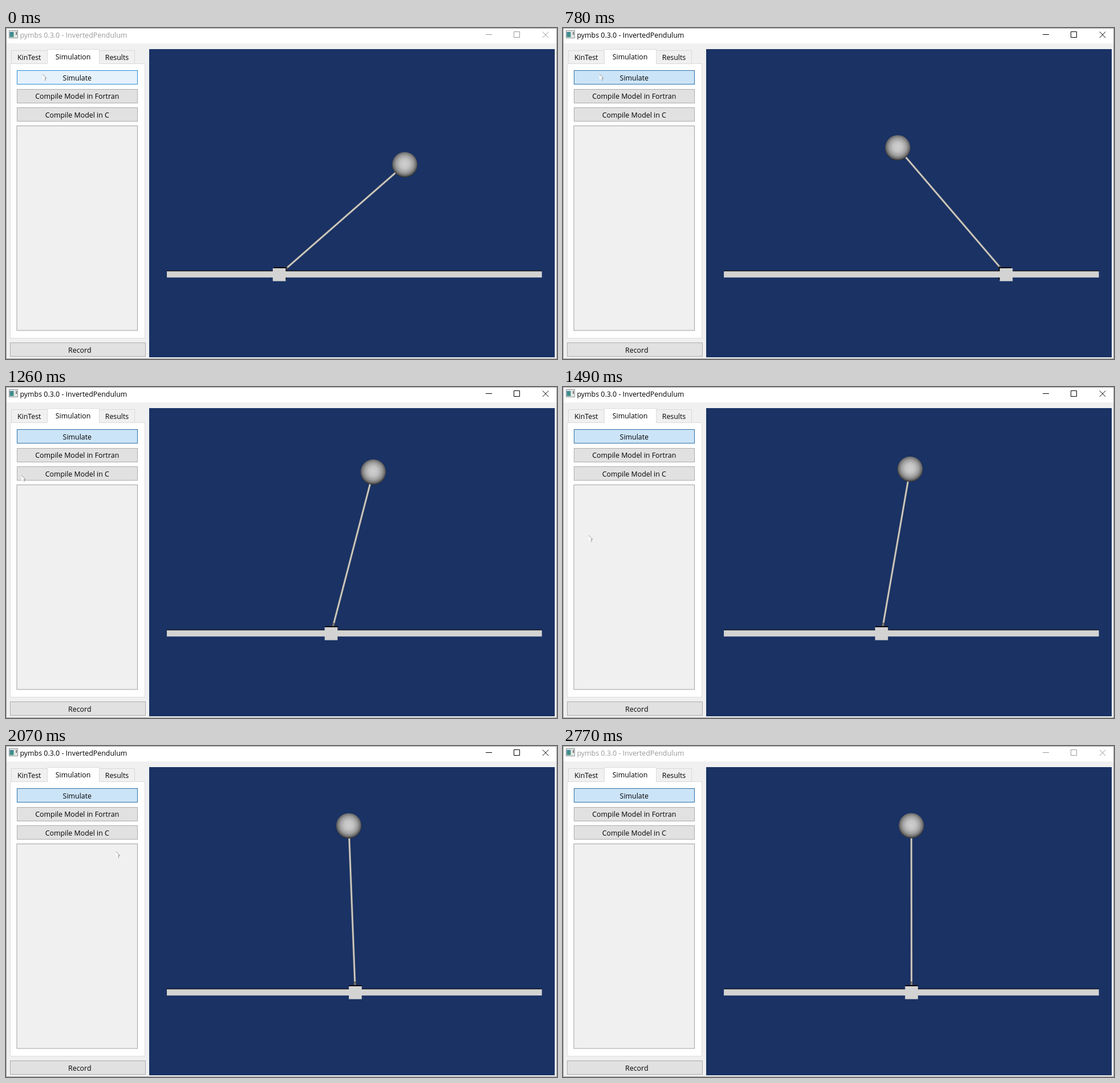
These frames come from a looping animation (966 px wide and 580 px high, 2790 ms). An HTML page:

```html
<!DOCTYPE html>
<html lang="en">
<head>
<meta charset="utf-8">
<title>Inverted pendulum</title>
<style>
  html, body { margin: 0; width: 100%; height: 100%; overflow: hidden; background: #f0f0f0; }
  svg { display: block; width: 966px; height: 580px; }
  text { font: 12.4px "Open Sans", "Noto Sans", sans-serif; fill: #000; }
  .mid { text-anchor: middle; }
  .btn { fill: #e1e1e1; stroke: #adadad; }
  .tab { fill: #f0f0f0; stroke: #d9d9d9; }
  .page { fill: #fff; stroke: #dcdcdc; }
  #run { fill: #e5f1fb; stroke: #2a8dd8; }
  .pressed #run { fill: #cce4f7; stroke: #2d70a8; }
  #caption text { fill: #999; }
  #caption path { fill: none; stroke: #999; }
  .active #caption text { fill: #000; }
  .active #caption path { stroke: #000; }
</style>
</head>
<body>
<svg id="stage" viewBox="0 0 966 580">
  <defs>
    <radialGradient id="ball" cx=".5" cy=".47" r=".53">
      <stop offset="0" stop-color="#d0d0d0"/>
      <stop offset=".35" stop-color="#c3c3c3"/>
      <stop offset=".65" stop-color="#9e9e9e"/>
      <stop offset=".86" stop-color="#6c6c6c"/>
      <stop offset="1" stop-color="#2b2b2b"/>
    </radialGradient>
    <linearGradient id="screen" x2="1" y2="1">
      <stop offset="0" stop-color="#3f7fa0"/>
      <stop offset="1" stop-color="#3f9a78"/>
    </linearGradient>
  </defs>

  <rect width="966" height="580" fill="#f0f0f0"/>
  <rect width="966" height="27" fill="#fff"/>

  <g id="caption">
    <rect x="5.5" y="4.5" width="15" height="13" fill="#e4e6e6" stroke="#8f9696"/>
    <rect x="6.5" y="7" width="7" height="9" fill="url(#screen)"/>
    <rect x="17.5" y="7" width="1.5" height="5" fill="#555"/>
    <text x="24.5" y="17">pymbs 0.3.0 - InvertedPendulum</text>
    <path d="M841 11.5h11M890.5 6.5h10v10h-10zM940.7 6.5l10.5 10.5M951.2 6.5l-10.5 10.5"/>
  </g>

  <rect class="page" x="7.5" y="62.5" width="236" height="481"/>
  <rect class="tab" x="9.5" y="39.5" width="63" height="23"/>
  <rect class="tab" x="163.5" y="39.5" width="62" height="23"/>
  <path class="page" d="M72.5 63V37.5h91V63"/>
  <rect x="73" y="61" width="90" height="3" fill="#fff"/>
  <text class="mid" x="40.7" y="56">KinTest</text>
  <text class="mid" x="117.6" y="55">Simulation</text>
  <text class="mid" x="194.5" y="56">Results</text>

  <rect id="run" x="19.5" y="74.5" width="211" height="24"/>
  <rect class="btn" x="19.5" y="107.5" width="211" height="24"/>
  <rect class="btn" x="19.5" y="139.5" width="211" height="24"/>
  <rect class="btn" x="7.5" y="551.5" width="237" height="24"/>
  <text class="mid" x="124.8" y="92">Simulate</text>
  <text class="mid" x="124.8" y="124.3">Compile Model in Fortran</text>
  <text class="mid" x="124.8" y="157">Compile Model in C</text>
  <text class="mid" x="129.3" y="569.3">Record</text>
  <rect x="19" y="171.5" width="211.5" height="358.5" fill="#f0f0f0" stroke="#a0a0a0"/>

  <rect x="251" y="37" width="711" height="540" fill="#1a3264"/>
  <g id="arm" stroke-linecap="butt">
    <path d="M0 0V-275" stroke="#85837f" stroke-width="3.6"/>
    <path d="M0 0V-275" stroke="#d6d2ca" stroke-width="2"/>
    <path d="M0 0V-19" stroke="#45474b" stroke-width="5"/>
    <path d="M0 0V-18" stroke="#85878a" stroke-width="2"/>
  </g>
  <circle id="bob" r="22.2" fill="url(#ball)"/>
  <rect id="back" x="-11" y="419" width="22" height="22" fill="#05070c"/>
  <rect x="282" y="425" width="657.5" height="2" fill="#0a0d14"/>
  <rect x="282" y="426.3" width="657.5" height="10.9" fill="#d3d3d3"/>
  <rect id="cart" x="-11.3" y="421" width="22.6" height="22.6" fill="#d3d3d3"/>

  <g id="cursor">
    <path d="M0 0V9.5L2.3 7.6 3.8 11 5.4 10.2 4 7.2 7 7Z" fill="#fff"/>
    <path d="M0 0L7 7H4L5.4 10.2 3.8 11" fill="none" stroke="#777" stroke-width=".8"/>
  </g>
  <path d="M.5 .5H965.5V579.5H.5Z" fill="none" stroke="#9b9b9b"/>
</svg>

<script>
const LOOP = 2790, PRESS = 430, BLUR = 2720, LEAVE = 2600;
const HOME = 611, AXIS = 432, LENGTH = 292.4;

// Screen updates come every 60 ms, apart from a few uneven ones.
const UNEVEN = { 5: 50, 11: 50, 12: 70, 15: 50, 23: 50, 27: 50, 35: 50, 40: 50 };
const ticks = [0, PRESS];
for (let i = 1; i <= 40; i++) ticks.push(ticks[i] + (UNEVEN[i] || 60));

// time, cart x, pendulum angle
const swing = [
  [490, 479, .852], [550, 500, .72], [610, 560, .3], [670, 645, -.25],
  [720, 715, -.56], [780, 777, -.708], [840, 796, -.66], [900, 797, -.5],
  [960, 768, -.3], [1070, 653.5, .024], [1140, 606, .14], [1260, 570, .255],
  [1370, 559, .275], [1430, 557.5, .25], [1490, 558.5, .172], [1610, 568, .045],
  [1730, 587, -.03], [1840, 603, -.053], [2010, 612.5, -.045],
  [2310, 611.3, -.0154], [2770, 611, -.001]
];

// time, pointer x, pointer y
const pointer = [
  [900, 64, 81], [1070, 31, 76], [1490, 45, 260],
  [1840, 192, 187], [2010, 192, 187], [2310, 198, 166]
];

function slope(keys, i, c) {
  const a = keys[i - 1], b = keys[i], d = keys[i + 1];
  if (!a || !d || (b[c] - a[c]) * (d[c] - b[c]) <= 0) return 0;
  return (d[c] - a[c]) / (d[0] - a[0]);
}

// Cubic Hermite curve through column c, level at turning points.
function curve(keys, t, c) {
  const last = keys.length - 1;
  if (t <= keys[0][0]) return keys[0][c];
  if (t >= keys[last][0]) return keys[last][c];
  const i = keys.findIndex(k => k[0] > t) - 1;
  const a = keys[i], b = keys[i + 1], span = b[0] - a[0];
  const u = (t - a[0]) / span, v = 1 - u;
  return a[c] * v * v * (1 + 2 * u) + b[c] * u * u * (3 - 2 * u)
    + span * u * v * (slope(keys, i, c) * v - slope(keys, i + 1, c) * u);
}

const el = id => document.getElementById(id);
const [stage, arm, bob, back, cart, cursor] =
  ["stage", "arm", "bob", "back", "cart", "cursor"].map(el);
const place = (node, x, y = 0, extra = "") =>
  node.setAttribute("transform", `translate(${x} ${y})${extra}`);

function draw(time) {
  const t = ticks.filter(s => s <= time).pop();
  const x = curve(swing, t, 1), angle = curve(swing, t, 2);
  place(cart, x);
  place(back, x + (HOME - x) * .013);
  place(arm, x, AXIS, ` rotate(${angle * 180 / Math.PI})`);
  place(bob, x + LENGTH * Math.sin(angle), AXIS - LENGTH * Math.cos(angle));
  place(cursor, curve(pointer, t, 1), curve(pointer, t, 2));
  cursor.style.display = t < LEAVE ? "" : "none";
  stage.classList.toggle("pressed", t >= PRESS);
  stage.classList.toggle("active", t >= PRESS && t < BLUR);
}

const start = performance.now();
function loop() {
  draw((performance.now() - start) % LOOP);
  requestAnimationFrame(loop);
}
loop();
</script>
</body>
</html>
```
